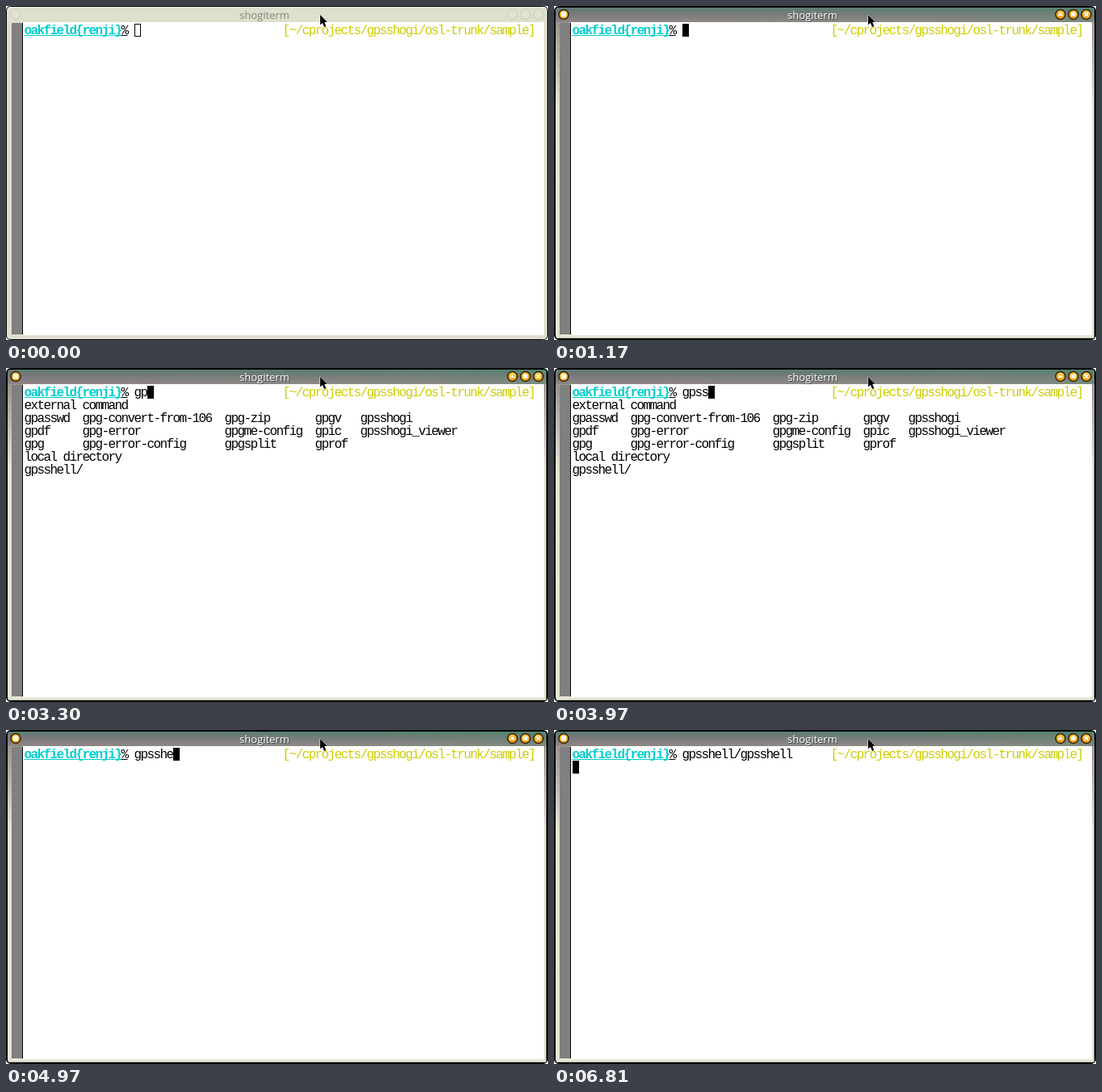
Animation, 671 px wide and 414 px high, one loop 8000 ms. Source, as an HTML page:

```html
<!DOCTYPE html>
<html lang="en">
<head>
<meta charset="utf-8">
<title>shogiterm</title>
<style>
  html, body { margin: 0; width: 100%; height: 100%; overflow: hidden; background: #fff; }
  #stage { position: absolute; left: 0; top: 0; width: 671px; height: 414px; overflow: hidden; }
  svg, #stage > div { position: absolute; }
  svg { left: 0; top: 0; }
  .active, .focused .idle { display: none; }
  .focused .active { display: inline; }
  #title { left: 289px; top: 2px; font: 13px/18px "Open Sans", "Noto Sans", sans-serif; color: #85857b; }
  .focused #title { color: #fff; text-shadow: 1px 1px 0 #3c4440; }
  #scrollbar { left: 7px; top: 21px; width: 13px; height: 386px; border-right: 1px solid #000;
    background: repeating-conic-gradient(#000 0 25%, #fff 0 50%) 0 0 / 2px 2px; }
  .text { left: 22.5px; top: 23px; white-space: pre; color: #000; letter-spacing: calc(8px - 1ch);
    font: 16px/16px "Liberation Mono", monospace; }
  #path { left: 342.5px; color: #cdcd00; }
  #list { top: 39px; }
  #prompt, #percent { text-decoration: underline 1px; text-underline-offset: 1px; text-decoration-skip-ink: none; }
  #prompt { color: #00cdcd; font-weight: bold; }
  #cursor { width: 8px; height: 16px; box-sizing: border-box; border: 1px solid #000; }
  #cursor.solid { background: #000; }
</style>
</head>
<body>
<div id="stage">
  <svg width="671" height="414">
    <defs>
      <linearGradient id="bar" x2="0" y2="1">
        <stop offset="0" stop-color="#4f8270"/>
        <stop offset=".4" stop-color="#747a79"/>
        <stop offset="1" stop-color="#928d87"/>
      </linearGradient>
      <linearGradient id="tint">
        <stop offset="0" stop-color="#8a6f80" stop-opacity=".25"/>
        <stop offset=".6" stop-color="#7a8080" stop-opacity=".15"/>
        <stop offset="1" stop-color="#5a8c70" stop-opacity=".35"/>
      </linearGradient>
      <linearGradient id="frame" x2="0" y2="1">
        <stop offset=".04" stop-color="#98938c"/>
        <stop offset=".3" stop-color="#e6e6d8"/>
      </linearGradient>
      <radialGradient id="gold" cy=".35">
        <stop offset="0" stop-color="#ffe070"/>
        <stop offset="1" stop-color="#eb9a10"/>
      </radialGradient>
    </defs>
    <rect class="idle" x=".5" y=".5" width="670" height="413" rx="5" fill="#dfdfce" stroke="#000"/>
    <path class="idle" d="M4 1.5H667" stroke="#efefe4"/>
    <g class="active">
      <rect x="1" y="1" width="669" height="412" rx="5" fill="url(#frame)" stroke="#000" stroke-width="2"/>
      <path d="M668.5 20V411.5H3" fill="none" stroke="#b4b4a6"/>
      <path id="barShape" d="M2 20V6Q2 2 6 2H665Q669 2 669 6V20Z" fill="url(#bar)"/>
      <path d="M2 20V6Q2 2 6 2H665Q669 2 669 6V20Z" fill="url(#tint)"/>
    </g>
    <rect x="21" y="20" width="645" height="388" fill="#fff"/>
    <g id="buttons"></g>
  </svg>
  <div id="title">shogiterm</div>
  <div id="scrollbar"></div>
  <div id="cursor"></div>
  <div class="text"><span id="prompt">oakfield{renji}</span><span id="percent">%</span> <span id="typed"></span></div>
  <div class="text" id="path">[~/cprojects/gpsshogi/osl-trunk/sample]</div>
  <div class="text" id="list"></div>
  <svg width="671" height="414">
    <path d="M389 11V23.5L391.8 21L394 26L396.3 25L394.2 20.1H397.8Z" stroke="#fff" paint-order="stroke"/>
  </svg>
</div>
<script>
const LOOP = 8000, FOCUS = 1040, SOLID = 1120, LIST_ON = 3300, LIST_OFF = 4250, ENTER = 6810;
const CELL = 8, ROW = 16, LEFT = 23, TOP = 22, INPUT_COL = 17;

const typing = [
  [0, ""], [2980, "g"], [3100, "gp"], [3760, "gps"], [3970, "gpss"], [4250, "gpssh"],
  [4970, "gpsshe"], [5260, "gpsshell/"], [5680, "gpsshell/g"], [5800, "gpsshell/gp"],
  [5920, "gpsshell/gpsshell "]
];

const columns = [9, 22, 14, 7, 0];
const row = (...words) => words.map((word, i) => word.padEnd(columns[i])).join("");
const listing = [
  "external command",
  row("gpasswd", "gpg-convert-from-106", "gpg-zip", "gpgv", "gpsshogi"),
  row("gpdf", "gpg-error", "gpgme-config", "gpic", "gpsshogi_viewer"),
  row("gpg", "gpg-error-config", "gpgsplit", "gprof"),
  "local directory",
  "gpsshell/"
].join("\n");

const $ = id => document.getElementById(id);

const buttons = [
  [12, "M-2.5 -2.5H2.5V2.5H-2.5Z"],
  [627, "M-2 1L0 -1L2 1Z"],
  [643, "M-2 -2H2V2H-2Z"],
  [659, "M-2.5 -2.5L2.5 2.5M2.5 -2.5L-2.5 2.5"]
];
$("buttons").innerHTML = buttons.map(([x, icon]) => `
  <g transform="translate(${x} 10.5)">
    <circle class="idle" r="6" fill="#e2e2d3" stroke="#c9c9b8"/>
    <g class="active">
      <circle r="6" fill="url(#gold)" stroke="#33260c" stroke-width="1.5"/>
      <path d="${icon}" fill="#fff" stroke="#fff" stroke-width="1.2"/>
    </g>
  </g>`).join("");

function setText(node, text) {
  if (node.textContent !== text) node.textContent = text;
}

function render(t) {
  const typed = typing.findLast(([start]) => t >= start)[1];
  const entered = t >= ENTER;
  $("stage").classList.toggle("focused", t >= FOCUS);
  $("cursor").classList.toggle("solid", t >= SOLID);
  setText($("typed"), typed);
  setText($("list"), t >= LIST_ON && t < LIST_OFF ? listing : "");
  const col = entered ? 0 : INPUT_COL + typed.length;
  $("cursor").style.left = LEFT + col * CELL + "px";
  $("cursor").style.top = TOP + (entered ? ROW : 0) + "px";
}

const begin = performance.now();
function frame() {
  render((performance.now() - begin) % LOOP);
  requestAnimationFrame(frame);
}
frame();
</script>
</body>
</html>
```
